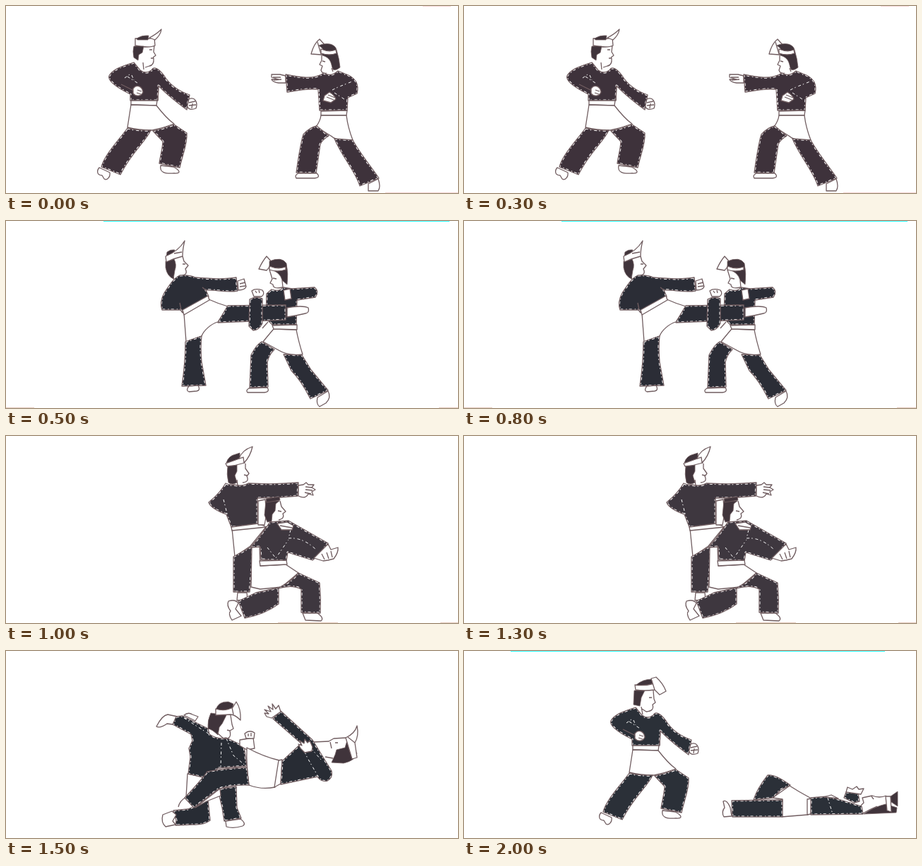
Animation, 640 px wide and 265 px high, one loop 2100 ms. Source, as an HTML page with a canvas:

```html
<!DOCTYPE html>
<html lang="en">
<head>
<meta charset="utf-8">
<title>Sparring</title>
<style>
html, body { margin: 0; height: 100%; overflow: hidden; background: #fff; }
canvas { display: block; }
</style>
</head>
<body>
<canvas id="stage" width="640" height="265"></canvas>
<script>
const ctx = document.getElementById('stage').getContext('2d');
const LOOP = 2100, HOLD = 500;

// Kinds: C cloth, H hair, W white shape, L dark line, S white dashes.
const guardBody = `
C M181 80 C170 84 152 88 146 99 C143 107 162 118 176 125 L176 134 L215 134 L216 113 C228 126 240 135 256 147 L260 126 C243 120 232 112 224 99 C216 88 209 85 206 91 Q198 97 190 91 Z
S M168 102 L175 97 M172 100 L186 109 M178 98 L181 105
L M215 134 L216 113 M163 111 L181 120
W M180 117 C185 110 193 114 194 122 C192 128 184 129 180 124 Z
L M185 123 L191 125 M186 119 L192 121
W M177 134 L214 134 L213 141 L177 140 Z
W M177 140 L213 141 C220 150 228 160 238 167 Q222 173 207 176 Q188 176 172 172 Z
C M172 173 Q188 177 205 176 C198 192 178 207 162 239 L135 228 C140 210 160 190 172 173 Z
W M132 229 L147 236 C148 242 143 248 139 245 L136 240 C129 240 128 234 132 229 Z
C M208 177 Q222 174 238 168 L256 180 C257 196 250 210 246 229 L217 223 C219 210 222 200 222 192 Z
W M219 226 L237 228 C247 233 248 238 238 237 C225 238 217 236 219 226 Z
W M259 132 C267 128 272 136 269 145 C262 148 256 146 257 140 Z
L M259 137 L268 135 M259 141 L269 140 M263 145 L264 138`;

const poses = [
  { cloth: '#3e323b', art: `
W M183 46 Q196 48 210 45 L211 56 Q203 60 183 56 Z
W M203 45 Q213 40 220 33 Q219 41 211 48 Z
H M185 46 Q193 41 202 42 L201 48 L186 48 Z
H M181 57 L195 57 L193 66 L188 69 L187 77 L181 73 Q179 64 181 57 Z
L M210 56 L209 65 L212 70 L208 73 M205 74 L209 74 Q210 84 203 85 L197 87 M194 80 L195 90 M203 62 L207 62
${guardBody}
W M376 97 L388 97 L396 99 L396 109 L386 109 Q378 108 376 104 L386 104 L376 101 Z
L M378 101 L389 101 M379 105 L390 104
C M396 97 L398 122 C414 119 430 117 442 118 L444 148 L483 148 L484 130 L497 124 C500 112 497 102 480 96 L470 92 Q460 101 450 95 C436 105 415 101 396 97 Z
S M462 119 L470 115 L490 107 M465 123 L479 132 M443 118 L444 142
W M451 127 L458 122 Q466 127 467 132 L460 137 L449 134 Z
L M454 129 L464 133 M456 126 L466 130
W M432 68 Q436 53 444 47 L453 57 Q451 66 446 69 Z
L M441 51 L446 68
H M443 56 C455 51 466 54 468 62 Q472 75 473 87 Q467 92 463 90 C460 84 462 74 448 70 L448 60 Z
W M446 61 Q458 66 467 62 L468 67 Q458 71 446 67 Z
L M447 68 L447 77 L444 83 L448 85 L446 91 Q448 97 454 95 M448 78 L452 79 M461 88 L463 93
W M446 149 L483 148 L482 155 L446 155 Z
W M446 155 L482 155 Q484 172 491 190 Q470 193 460 184 L439 171 Q445 163 446 155 Z
C M440 170 L457 184 Q447 190 445 196 L439 237 L411 236 C414 215 417 195 421 182 Q430 172 440 170 Z
W M414 237 L440 237 Q446 243 437 244 L411 244 Q408 240 414 237 Z
C M465 188 L491 190 C500 207 515 225 528 244 L501 255 C495 235 475 212 465 188 Z
W M513 252 L527 245 Q531 256 527 262 L513 262 Z`,
    strips: [['#f6d9d9', 537, 264, 103], ['#f6d9d9', 590, 0, 40]] },

  { cloth: '#2b2d36', art: `
H M228 44 Q233 40 239 41 L238 50 L227 51 Z
H M226 57 L238 54 Q242 62 239 70 L237 82 Q228 78 226 66 Z
W M226 50 Q244 43 253 28 Q250 40 250 50 Q238 53 227 58 Z
L M238 46 L249 44 M250 50 L252 57 L258 63 L254 68 Q258 76 249 77 M237 78 L238 84 M250 61 L254 61
C M246 77 Q260 76 268 80 C290 82 310 83 326 80 L328 99 C312 102 296 97 283 98 L287 107 L250 130 L247 126 L221 126 Q217 115 224 102 C231 92 236 82 246 77 Z
L M248 126 L246 116 M283 98 L278 94
W M328 85 L337 82 L340 93 Q338 98 329 98 Z
L M331 89 L339 87 M331 93 L339 92
W M252 131 L287 111 Q300 117 314 121 L300 143 C290 146 280 155 277 163 L255 171 Z
W M250 126 L286 106 L288 112 L252 133 Z
C M254 171 L277 163 Q275 178 277 200 L283 233 L249 234 Q254 200 254 171 Z
W M259 234 L272 233 Q276 240 270 241 L259 242 Q254 240 259 234 Z
W M358 68 Q363 57 369 50 L377 59 Q371 68 369 70 Z
H M373 57 Q390 50 397 60 Q400 75 398 90 L391 84 Q388 72 373 68 Z
W M373 64 Q385 69 396 65 L396 69 Q384 73 373 69 Z
L M373 69 L377 82 L374 88 L378 90 Q378 97 391 94 M378 81 L383 82 M391 84 L392 94
C M376 97 Q388 101 392 94 L405 96 L437 94 Q444 100 438 108 L412 112 L411 147 L377 147 L368 138 L369 103 Z
W M393 98 L402 96 L404 110 L395 112 Z
W M379 153 L411 154 Q414 170 420 189 Q400 192 384 182 L364 171 Q373 160 379 153 Z
W M377 148 L412 147 L412 154 L379 153 Z
L M371 143 L363 152
C M314 120 L396 119 L396 140 L300 144 Z
W M398 123 Q420 119 428 123 Q430 130 424 131 Q412 134 398 136 Z
W M351 107 L348 99 Q353 95 363 98 Q367 103 362 107 Z
L M353 99 L355 102 M358 98 L359 102
C M345 111 Q354 106 363 110 L363 145 Q358 155 350 155 L344 149 Z
C M362 171 L380 182 Q372 190 370 200 L371 235 L345 236 L347 190 Q354 176 362 171 Z
W M344 237 L370 236 Q374 242 366 243 L342 243 Q339 240 344 237 Z
C M393 189 L419 190 L432 211 L456 240 L431 252 Q418 226 404 212 Z
W M441 250 L456 241 Q461 250 453 258 L444 263 Q439 260 441 250 Z`,
    strips: [['#3ff', 138, 0, 490], ['#e8cfc4', 0, 264, 40], ['#e8cfc4', 613, 264, 27]] },

  { cloth: '#3e373f', art: `
H M312 38 Q315 28 325 26 L331 24 L331 34 Z
H M314 43 L327 41 L327 50 L324 56 L327 66 Q320 70 315 66 Q312 54 314 43 Z
W M311 39 L336 30 L338 38 Q325 42 313 43 Z
W M330 32 Q334 20 349 15 Q346 29 337 38 L336 30 Z
L M339 39 L339 46 L344 53 L341 57 Q345 65 335 66 M327 62 L328 70 M337 55 L341 56
C M311 67 Q318 70 322 69 Q335 72 343 67 Q380 69 414 66 L413 85 Q385 88 356 88 L356 127 L319 129 L312 111 Q290 103 287 94 Q302 82 311 67 Z
S M308 90 L313 110
W M414 70 L421 69 L425 66 L428 69 L436 69 L433 73 L438 76 L433 79 L435 84 L428 82 Q424 90 414 85 Z
L M424 72 L433 73 M424 76 L434 77 M423 80 L432 82
W M320 131 L368 129 L346 156 L324 171 Z
W M319 129 L357 124 L369 129 L320 134 Z
C M322 171 L349 156 L348 188 L345 221 L322 221 Z
W M328 222 L341 222 L342 232 L327 233 Z
W M348 157 L359 157 L360 184 L396 182 L414 194 Q400 206 390 214 L360 217 L347 214 Z
W M357 92 L367 90 L369 110 L366 126 L357 126 Z
H M368 92 L387 92 L382 96 L381 106 L377 111 L376 121 L370 122 L366 112 Z
H M368 89 L387 86 L388 91 L369 94 Z
L M388 92 L390 100 L396 107 L392 110 Q395 117 386 119 M385 106 L390 107
C M368 130 L374 122 L400 120 L456 152 L444 168 L434 176 L399 165 L397 177 L361 175 L360 157 L346 158 L358 144 Z
S M370 158 L382 173 L400 147 M403 133 L400 145 Q420 143 439 161
W M384 124 L398 122 L407 127 L405 133 L390 133 Z
L M388 127 L405 130
W M440 169 L456 153 L460 161 L470 158 Q471 165 464 174 L456 176 L449 177 L436 173 Z
L M447 167 L451 175 M454 165 L457 174 M460 163 L462 172
W M359 177 L397 176 L398 182 L360 184 Z
C M386 215 Q405 206 414 194 L444 208 Q446 230 445 251 L418 250 L418 217 Q405 210 386 216 Z
W M420 251 L441 251 Q451 258 446 262 L424 261 Z
C M329 234 L354 222 L386 215 L386 238 Q366 253 338 258 Z
W M315 234 Q325 231 329 237 L325 245 L333 255 L320 261 Q314 252 318 248 Q312 240 315 234 Z`,
    strips: [['#e8cfc4', 385, 264, 85], ['#e8cfc4', 615, 264, 25]] },

  { cloth: '#282c34', art: `
W M252 91 Q258 86 264 90 L272 93 L268 99 Z
W M213 107 Q221 91 229 90 L243 93 L236 104 L228 103 Q218 110 213 107 Z
W M257 174 L290 180 L270 204 L255 207 Z
C M241 93 L250 92 L286 110 L288 118 Q300 126 312 123 L337 135 L341 163 L300 166 L283 180 L258 174 L261 150 L259 138 L264 127 L262 118 L236 104 Z
S M252 95 L288 118 M305 130 L304 165 M312 124 L322 148 L341 164
H M297 83 Q301 71 315 72 L322 75 L320 84 L298 88 Z
H M290 88 L312 91 L306 103 L302 108 L300 119 Q292 111 286 110 Q285 98 290 88 Z
W M297 82 Q310 86 321 80 L326 72 Q333 82 332 98 Q324 90 318 90 L297 91 Z
L M320 80 L322 90 M318 91 L320 104 L322 110 L317 113 Q320 126 308 124 L299 116 M313 112 L317 113
L M255 207 Q246 212 244 221 M266 222 L284 213
W M331 126 L350 123 L352 138 L341 140 L331 134 Z
W M340 124 L338 117 Q345 111 352 116 L351 124 Z
L M343 117 L343 121 M347 116 L347 121
W M341 137 Q365 150 387 155 L381 193 Q362 197 344 190 Q340 160 341 137 Z
C M304 195 L326 192 L327 222 L333 237 L309 241 L306 222 L302 205 Z
W M311 241 L332 238 Q341 245 335 248 Q322 252 312 249 Z
C M237 226 L258 224 L286 211 L289 240 Q280 247 264 246 L240 247 L241 240 Z
W M222 232 L235 227 L241 232 L236 241 L240 246 L226 249 Q219 243 222 232 Z
W M268 222 L303 195 L304 205 L284 213 Z
C M341 165 L344 190 Q316 189 300 196 L266 222 L253 208 Q275 185 285 171 Q310 166 341 165 Z
W M386 155 L391 154 L389 188 L380 193 Z
L M435 129 L457 128 L464 124 L481 123 M452 150 L463 152 M459 129 L461 138 M466 130 L470 130
H M461 158 L466 147 L468 140 L480 137 L483 127 L497 145 Q495 155 478 159 Z
W M481 123 Q494 117 497 106 Q500 120 494 130 L497 151 L490 153 Z
L M484 122 L494 130
C M391 156 L418 131 L378 96 L389 85 L434 126 L461 170 Q463 180 455 184 Q446 186 441 178 L389 189 Z
S M418 131 L426 150 L442 178 M432 138 L446 154
W M376 95 L369 93 L366 88 L372 89 L366 83 L375 86 L371 78 L378 83 L377 75 L382 82 L386 77 L389 86 Z
W M423 144 L417 138 L414 132 L419 134 L416 127 L422 131 L423 125 L427 130 L430 127 L434 136 L433 142 Z`,
    strips: [] },

  { cloth: '#2b3038', shift: 62, art: `
H M244 48 Q253 40 266 40 L267 48 L244 50 Z
H M241 56 L256 56 L251 66 L249 78 L240 76 Z
W M242 48 Q255 50 270 46 L270 55 Q255 57 243 55 Z
W M265 39 L272 37 Q282 46 286 57 L277 62 L270 55 Z
L M268 56 L269 68 L271 73 L267 76 Q270 85 258 86 L252 82 M262 66 L266 66 M251 79 L253 90
C M410 211 Q415 195 430 176 Q440 174 462 190 L448 197 L438 208 Z
W M437 208 L461 191 Q475 200 490 208 L487 232 L450 235 L451 210 Z
C M379 212 L451 211 L451 235 L380 235 Z
W M367 213 Q372 210 377 222 L379 234 L368 235 Q364 228 369 222 Z
W M486 210 L492 209 L491 231 L486 232 Z
C M491 208 L515 206 L530 210 L563 220 L565 231 L491 232 Z
S M515 208 L522 231
W M510 207 L520 204 L530 209 Z
C M541 200 L558 201 L560 213 L552 215 L538 208 Z
W M541 200 L543 193 L550 196 L556 192 L559 196 L566 195 L562 203 Z
L M562 219 L566 215 L564 208 L578 205 Q588 209 598 205 M565 230 Q575 224 585 220 M577 206 L580 210
H M566 231 Q580 221 597 217 L613 222 L612 229 Z
W M597 206 L604 206 L605 228 L599 226 Z
H M604 206 L614 199 L614 220 L605 214 Z`,
    strips: [['#3ff', 66, 0, 530]] }
];
const HAIR = '#40343b', INK = '#705d60';

const parse = art => art.trim().split('\n').map(line => [line[0], new Path2D(line.slice(2))]);
const guard = parse(guardBody);
for (const pose of poses) pose.shapes = parse(pose.art);

function dashes(path, width) {
  ctx.setLineDash([4, 3, 1.5, 4]);
  ctx.lineWidth = width;
  ctx.strokeStyle = '#fff';
  ctx.stroke(path);
  ctx.setLineDash([]);
}

function drawShape(kind, path, cloth) {
  if (kind === 'S') return dashes(path, 1);
  if (kind !== 'L') {
    ctx.fillStyle = { C: cloth, H: HAIR, W: '#fff' }[kind];
    ctx.fill(path);
  }
  if (kind === 'C') {
    ctx.save();
    ctx.clip(path);
    dashes(path, 3);
    ctx.restore();
  }
  ctx.lineWidth = kind === 'H' ? 0.8 : 1.3;
  ctx.strokeStyle = INK;
  ctx.stroke(path);
}

function drawPose({ cloth, shapes, strips, shift }) {
  ctx.fillStyle = '#fff';
  ctx.fillRect(0, 0, 640, 265);
  for (const [color, x, y, width] of strips) {
    ctx.fillStyle = color;
    ctx.fillRect(x, y, width, 1);
  }
  for (const [kind, path] of shapes) drawShape(kind, path, cloth);
  if (shift) {
    ctx.save();
    ctx.translate(shift, 0);
    for (const [kind, path] of guard) drawShape(kind, path, cloth);
    ctx.restore();
  }
}

ctx.lineJoin = 'round';
const start = performance.now();
function tick() {
  const time = Math.max(0, performance.now() - start) % LOOP;
  drawPose(poses[Math.floor(time / HOLD)]);
  requestAnimationFrame(tick);
}
tick();
</script>
</body>
</html>
```
